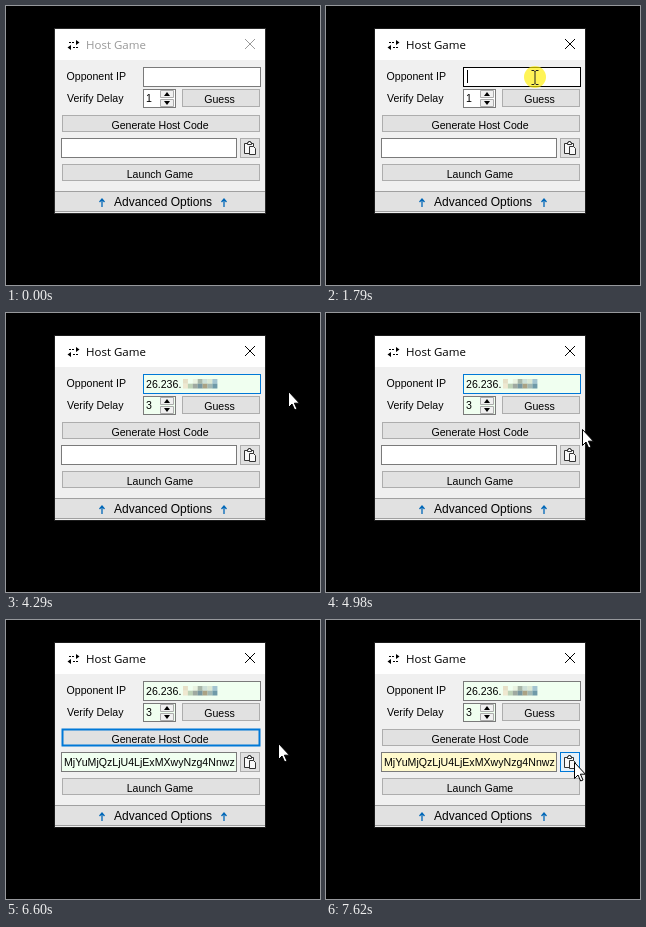
These frames come from a looping animation (314 px wide and 279 px high, 8 s). An HTML page:

```html
<!DOCTYPE html>
<html lang="en">
<head>
<meta charset="utf-8">
<title>Host Game</title>
<style>
html, body { margin: 0; width: 100%; height: 100%; overflow: hidden; background: #000; }
svg { display: block; width: 314px; height: 279px; }
text { font: 10.6px "Liberation Sans", Arial, sans-serif; fill: #000; }
.mid { text-anchor: middle; }
.button { fill: #e1e1e1; stroke: #adadad; }
.button.focus { stroke: #0078d7; stroke-width: 2; }
.button.hot { fill: #e5f1fb; stroke: #0078d7; stroke-width: 1; }
.field { fill: #fff; stroke: #7a7a7a; }
.field.hot { stroke: #000; }
.field.focus { stroke: #0078d7; }
.field.valid { fill: #f0fff0; }
.field.copied { fill: #fffacd; }
#title { font: 11.5px "Open Sans", sans-serif; fill: #999; }
#close { stroke: #999; }
#frame { stroke: #2b2b2b; }
.active #title { fill: #000; }
.active #close { stroke: #000; }
.active #frame { stroke: #1c1c1c; }
</style>
</head>
<body>
<svg viewBox="0 0 314 279">
  <rect width="314" height="279"/>
  <g id="window">
    <rect id="frame" x="48.5" y="22.5" width="211" height="185" fill="#f0f0f0"/>
    <rect x="49" y="23" width="210" height="31" fill="#fff"/>
    <path d="M63 36.500h6M67 41.500h6" stroke="#000" stroke-dasharray="2 1"/>
    <path d="M70 34l3.500 2.500-3.500 2.500zM65 39l-3.500 2.500 3.500 2.500z"/>
    <text id="title" x="80" y="43">Host Game</text>
    <path id="close" d="M239 33l10 10M249 33l-10 10" fill="none"/>

    <text x="60.500" y="74">Opponent IP</text>
    <rect id="ip" class="field" x="137.500" y="61.500" width="117" height="19"/>
    <path id="caret" d="M141.500 64v13" stroke="#000"/>
    <g id="address"><text x="140" y="75">26.236.</text></g>

    <text x="61" y="96">Verify Delay</text>
    <rect id="delay" class="field" x="137.500" y="83.500" width="32" height="18"/>
    <text id="count" x="140" y="96">1</text>
    <path d="M154.500 84.500h13v7h-13zM154.500 93.500h13v7h-13z" fill="#f0f0f0" stroke="#acacac"/>
    <path d="M158 90l3-4 3 4zM158 95l3 4 3-4z"/>

    <rect id="guess" class="button" x="176.500" y="83.500" width="77" height="17"/>
    <text class="mid" x="213.500" y="97">Guess</text>
    <rect id="generate" class="button" x="56.500" y="109.500" width="197" height="16"/>
    <text class="mid" x="154" y="123">Generate Host Code</text>
    <rect id="code" class="field" x="55.500" y="132.500" width="175" height="19"/>
    <text id="codeText" x="58" y="146">MjYuMjQzLjU4LjExMXwyNzg4Nnwz</text>
    <rect id="copy" class="button" x="234.500" y="132.500" width="19" height="19"/>
    <g fill="#f8f8f8" stroke="#333">
      <path d="M238.500 137.500h9v10h-9z"/>
      <path d="M241.500 138.500v-2h1v-1h2v1h1v2z"/>
      <path d="M243.500 140.500h4l2 2v6h-6z"/>
    </g>
    <rect class="button" x="56.500" y="158.500" width="197" height="16"/>
    <text class="mid" x="154" y="172">Launch Game</text>

    <path d="M49 185h210v21H49z" fill="#e1e1e1"/>
    <path d="M49 185.500h210M49 205.500h210" stroke="#a0a0a0"/>
    <text x="108" y="200" style="font-size:12px">Advanced Options</text>
    <path d="M96 201v-8m-2.500 3l2.500-3 2.500 3M218 201v-8m-2.500 3l2.500-3 2.500 3"
      fill="none" stroke="#0067b8" stroke-width="1.300"/>
  </g>
  <g id="pointer">
    <circle id="click" r="11" fill="#ffee00"/>
    <path id="arrow" d="M.5 .5V16.500L4 13l2.700 6 2.300-1-2.600-5.800h5z" fill="#fff" stroke="#000"/>
    <path id="beam" d="M-3.500-6.500h2.500l1 1 1-1h2.500M0-6V6.500M-3.500 7.500h2.500l1-1 1 1h2.500"
      fill="none" stroke="#222"/>
  </g>
</svg>
<script>
const $ = id => document.getElementById(id);
const LOOP = 8000;

// Pointer path: time, number of steps to the next point, x, y
const path = [
  [460, 8, 300, 150], [1070, 2, 250, 105], [1250, 1, 243, 87],
  [1310, 4, 238, 80], [1640, 1, 209, 71],
  [3960, 4, 213, 71], [4290, 3, 282, 78], [4520, 3, 294, 96], [4750, 1, 272, 114],
  [4830, 4, 268, 115], [5130, 1, 244, 116],
  [6140, 6, 247, 117], [6600, 4, 272, 123], [6910, 1, 262, 141],
  [6990, 4, 259, 142], [7300, 1, 248, 142], [LOOP, 1, 248, 142]
];
const clicks = [1790, 5210, 7380];

// Pixelated end of the address, two rows of blocks
const mosaic = [
  "e6dfc6 f0fff0 e9f2e0 a9b7a9 cde0d8 dce8d4 a3c4d0",
  "efe8d0 bdd2b6 9fa9a0 7897a0 aaa284 a2b8b4 6f9aa8"
];
mosaic.forEach((row, r) => row.split(" ").forEach((color, c) => {
  $("address").insertAdjacentHTML("beforeend",
    `<rect x="${177 + c * 4.9}" y="${66 + r * 4.7}" width="5" height="4.8" fill="#${color}"/>`);
}));

const show = (id, on) => $(id).setAttribute("visibility", on ? "visible" : "hidden");
const flag = (id, name, on) => $(id).classList.toggle(name, on);

function pointerAt(t) {
  const i = Math.max(0, path.findLastIndex(p => p[0] <= t));
  const [t0, steps, x, y] = path[i];
  const [t1, , nx, ny] = path[i + 1];
  const k = Math.max(0, Math.floor((t - t0) / (t1 - t0) * steps + 1e-6) / steps);
  return [x + (nx - x) * k, y + (ny - y) * k];
}

function draw(t) {
  const during = (a, b = LOOP) => t >= a && t < b;

  const [x, y] = pointerAt(t);
  const overText = during(1310, 4040);
  const visible = t >= 460;
  const age = Math.min(...clicks.map(c => t >= c ? t - c : LOOP));
  $("pointer").setAttribute("transform", `translate(${Math.round(x)} ${Math.round(y)})`);
  show("arrow", visible && !overText);
  show("beam", visible && overText);
  $("click").setAttribute("opacity", Math.max(0, .66 * (1 - Math.floor(age / 77) / 3)));

  flag("window", "active", during(1790));
  flag("ip", "hot", during(1310, 1870));
  flag("ip", "focus", during(1870, 5210));
  show("caret", during(1790, 2570));
  show("address", during(3430));
  for (const id of ["ip", "delay"]) flag(id, "valid", during(3430));
  $("count").textContent = during(3430) ? 3 : 1;

  flag("guess", "hot", during(1160, 1310));
  flag("generate", "hot", during(850, 1160) || during(5050, 6300));
  flag("generate", "focus", during(5210, 7380));
  flag("code", "valid", during(5360));
  flag("code", "copied", during(7460));
  show("codeText", during(5360));
  flag("copy", "hot", during(7140));
}

function tick(now) {
  draw(now % LOOP);
  requestAnimationFrame(tick);
}
draw(0);
requestAnimationFrame(tick);
</script>
</body>
</html>
```
